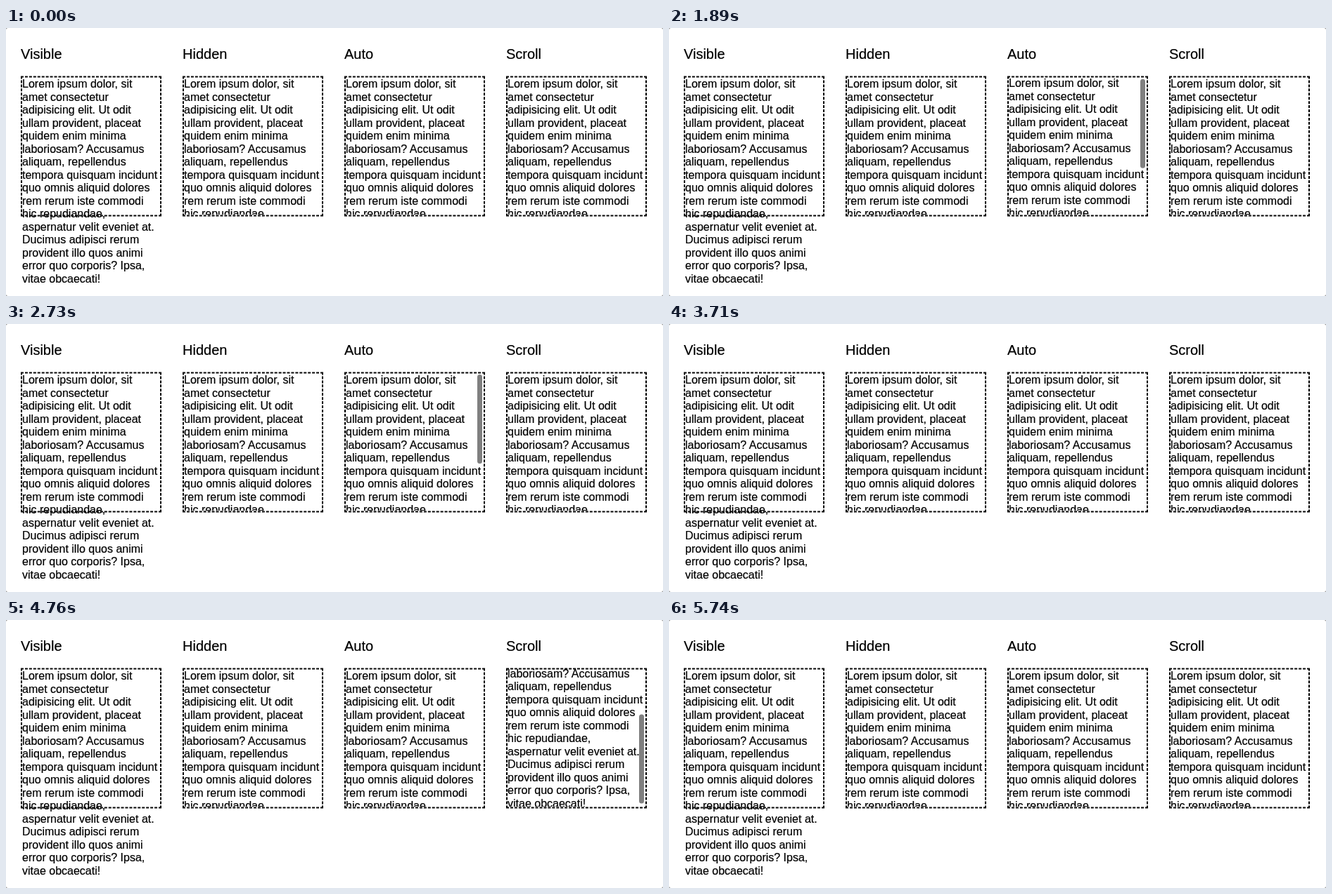
An HTML page that plays this animation: 934x382 px, repeating every 6.23 s.

```html
<!DOCTYPE html>
<html lang="en">
<head>
<meta charset="utf-8">
<title>Overflow values</title>
<style>
  @property --scroll { syntax: "<number>"; inherits: true; initial-value: 0; }
  @property --bar { syntax: "<number>"; inherits: true; initial-value: 0; }

  html, body { margin: 0; width: 100%; height: 100%; overflow: hidden; background: #888; }
  body { font: 16px/18.5px "Liberation Sans", Arial, sans-serif; color: #000; -webkit-text-stroke: .2px #000; }

  main { position: relative; width: 934px; height: 382px; background: #fff; border-radius: 3px; }
  section { position: absolute; top: 0; left: calc(21px + 230px * var(--col)); }
  h2 { position: absolute; top: 26px; left: 0; margin: 0; font: 20px/23px "Liberation Sans", Arial, sans-serif; }

  .box { position: absolute; top: 68px; left: 0; width: 200px; height: 200px; }
  .box svg { position: absolute; top: 0; left: 0; overflow: visible; }
  .edge { fill: none; stroke: #000; stroke-width: 2; stroke-dasharray: 4 1.9394; }

  .view { position: absolute; inset: 2px; }
  .clip { overflow: hidden; }
  .text { position: absolute; top: 1.25px; left: 0; margin: 0; white-space: pre;
          transform: translateY(calc(var(--scroll) * -1px)); }
  .thumb { position: absolute; top: 2px; right: 2px; width: 7px; height: 127px; border-radius: 3.5px;
           background: rgba(0, 0, 0, .5); opacity: var(--bar);
           transform: translateY(calc(var(--scroll) * .65px)); }

  .auto { animation: flick 6230ms step-end infinite; }
  .scroll { animation: drift 6230ms step-end infinite; }

  @keyframes flick {
    0% { --scroll: 0; --bar: 0; }
    30.33% { --scroll: 1; --bar: 1; }
    31.45% { --scroll: 42; --bar: 1; }
    32.58% { --scroll: 100; --bar: 1; }
    39.32% { --scroll: 99; --bar: 1; }
    40.44% { --scroll: 74; --bar: 1; }
    41.57% { --scroll: 34; --bar: 1; }
    42.69% { --scroll: 8; --bar: 1; }
    43.81% { --scroll: 0; --bar: 1; }
    52.80% { --scroll: 0; --bar: .75; }
    53.93% { --scroll: 0; --bar: .5; }
    55.05% { --scroll: 0; --bar: .25; }
    56.17%, 100% { --scroll: 0; --bar: 0; }
  }

  @keyframes drift {
    0% { --scroll: 0; --bar: 0; }
    65.16% { --scroll: 2; --bar: 1; }
    66.29% { --scroll: 25; --bar: 1; }
    67.41% { --scroll: 62; --bar: 1; }
    68.53% { --scroll: 100; --bar: 1; }
    73.03% { --scroll: 99.5; --bar: 1; }
    74.15% { --scroll: 99; --bar: 1; }
    75.28% { --scroll: 98; --bar: 1; }
    76.40% { --scroll: 96; --bar: 1; }
    77.52% { --scroll: 78; --bar: 1; }
    78.65% { --scroll: 42; --bar: 1; }
    79.77% { --scroll: 12; --bar: 1; }
    80.89% { --scroll: 0; --bar: 1; }
    88.76% { --scroll: 0; --bar: .75; }
    89.88% { --scroll: 0; --bar: .5; }
    91.01% { --scroll: 0; --bar: .25; }
    92.13%, 100% { --scroll: 0; --bar: 0; }
  }
</style>
</head>
<body>
<main></main>
<script>
  const lorem = `Lorem ipsum dolor, sit
amet consectetur
adipisicing elit. Ut odit
ullam provident, placeat
quidem enim minima
laboriosam? Accusamus
aliquam, repellendus
tempora quisquam incidunt
quo omnis aliquid dolores
rem rerum iste commodi
hic repudiandae,
aspernatur velit eveniet at.
Ducimus adipisci rerum
provident illo quos animi
error quo corporis? Ipsa,
vitae obcaecati!`;

  const column = (name, i) => `
    <section style="--col: ${i}">
      <h2>${name}</h2>
      <div class="box ${name.toLowerCase()}">
        <svg width="200" height="200">
          <path class="edge" transform="translate(0 .5)" d="M0 1H200M0 199H200M1 0V200M199 0V200"/>
        </svg>
        <div class="view ${i ? "clip" : ""}">
          <p class="text">${lorem}</p>
          ${i > 1 ? '<div class="thumb"></div>' : ""}
        </div>
      </div>
    </section>`;

  document.querySelector("main").innerHTML =
    ["Visible", "Hidden", "Auto", "Scroll"].map(column).join("");
</script>
</body>
</html>
```
